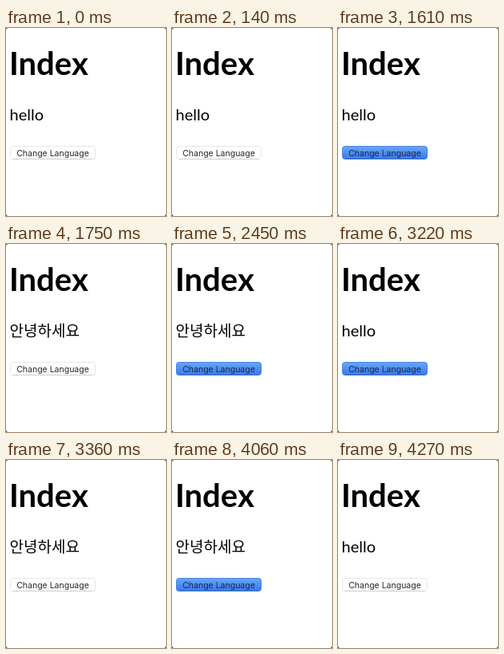
An HTML page that plays this animation: 200x236 px, repeating every 5.25 s.

```html
<!DOCTYPE html>
<html lang="ko">
<head>
<meta charset="utf-8">
<title>Index</title>
<style>
html, body { margin: 0; width: 100%; height: 100%; overflow: hidden; background: #fff; }
svg { display: block; width: 200px; height: 236px; }
.page { font-family: Lato, sans-serif; fill: #000; }
#title { font-size: 40px; font-weight: 700; }
#greeting { font-size: 20px; }
#greeting.korean { font: 19px "Noto Sans CJK KR", "Noto Sans CJK JP", "Noto Sans CJK", sans-serif; }
#label { font: 10.5px Inter, Roboto, sans-serif; fill: #262626; }
.pressed #label { fill: #14284f; }
#face { fill: #fff; stroke: #e6e6e6; }
#edge { stroke: #cdcdcd; }
.pressed #face { fill: url(#blue); stroke: #4585e6; }
.pressed #edge { stroke: #3468c4; }
</style>
</head>
<body>
<svg viewBox="0 0 200 236">
  <defs>
    <linearGradient id="blue" x2="0" y2="1">
      <stop offset="0" stop-color="#69a6f7"/>
      <stop offset="1" stop-color="#3b78e7"/>
    </linearGradient>
  </defs>
  <path d="M0 0h2L0 2zM200 0v2l-2-2zM0 236v-2l2 2zM200 236h-2l2-2z" fill="#555"/>
  <text id="title" class="page" x="4" y="59">Index</text>
  <text id="greeting" class="page" x="4.5" y="116">hello</text>
  <g id="button">
    <rect id="face" x="5.5" y="148.5" width="106" height="16" rx="3"/>
    <path id="edge" d="M8.5 164.5h100" fill="none"/>
    <text id="label" x="58.5" y="161" text-anchor="middle">Change Language</text>
  </g>
</svg>
<script>
const LOOP = 5250;
const HELLO = "hello", KOREAN = "안녕하세요";
// start time, greeting, button held down
const states = [
  [0, HELLO, false],
  [1610, HELLO, true],
  [1750, KOREAN, false],
  [2450, KOREAN, true],
  [2590, HELLO, false],
  [3220, HELLO, true],
  [3360, KOREAN, false],
  [4060, KOREAN, true],
  [4270, HELLO, false]
];
const greeting = document.getElementById("greeting");
const button = document.getElementById("button");
const begin = performance.now();
let shown;

function draw(now) {
  const t = Math.max(0, now - begin) % LOOP;
  const state = states.findLast(s => s[0] <= t);
  if (state !== shown) {
    shown = state;
    greeting.textContent = state[1];
    greeting.classList.toggle("korean", state[1] === KOREAN);
    button.classList.toggle("pressed", state[2]);
  }
  requestAnimationFrame(draw);
}
draw(begin);
</script>
</body>
</html>
```
